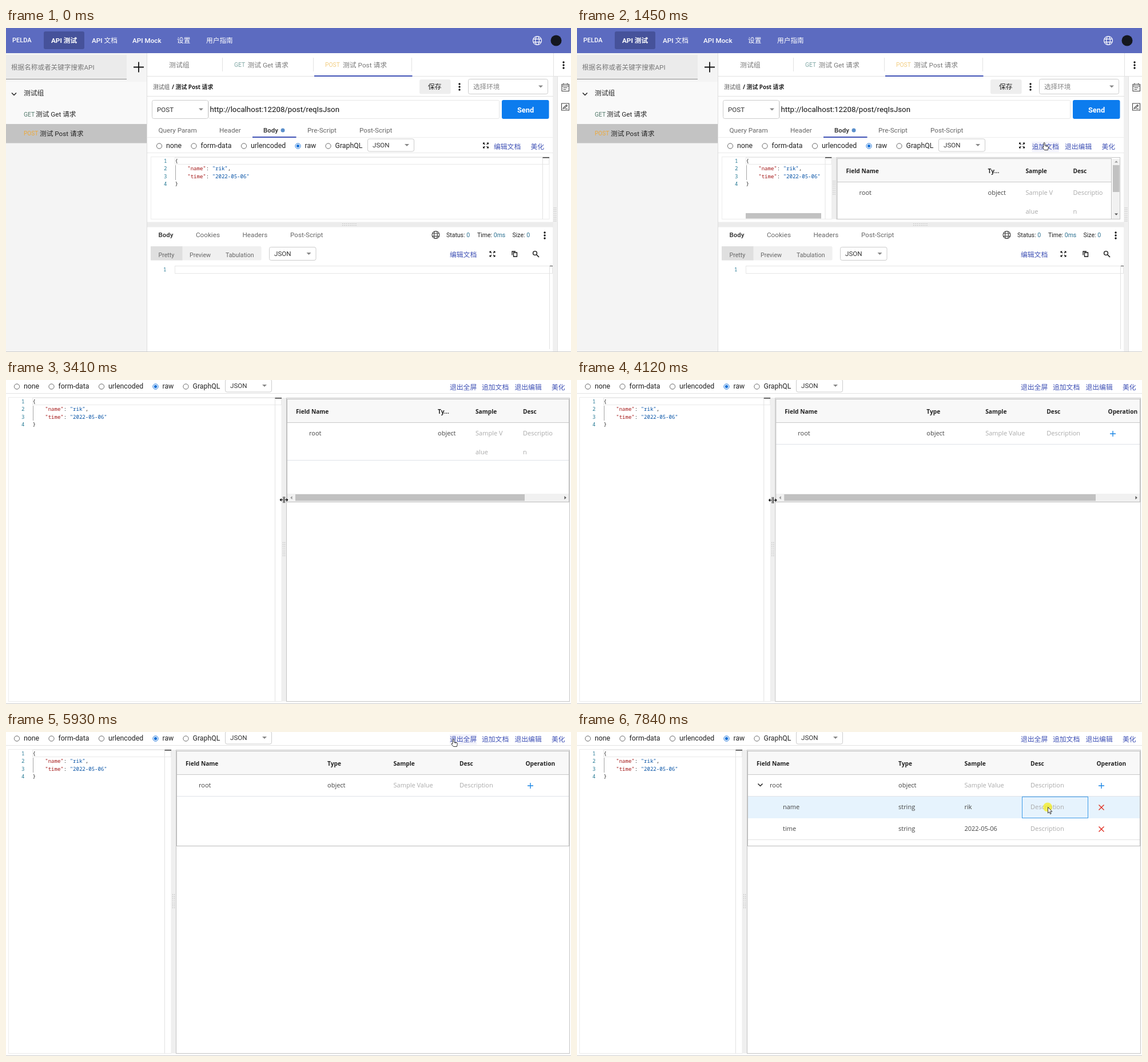
An HTML page that plays this animation: 988x567 px, repeating every 8 s.

```html
<!DOCTYPE html>
<html lang="zh-CN">
<head>
<meta charset="utf-8">
<style>
html, body { margin: 0; width: 100%; height: 100%; overflow: hidden; background: #fff; }
svg { display: block; }
text { white-space: pre; }
.ui { font-family: Roboto, "Noto Sans CJK SC", "Noto Sans CJK", sans-serif; }
.table { font-family: "Open Sans", "Noto Sans CJK SC", "Noto Sans CJK", sans-serif; }
.code { font-family: "Noto Sans Mono", "DejaVu Sans Mono", monospace; }
</style>
</head>
<body>
<svg id="stage" width="988" height="567" viewBox="0 0 988 567"><g id="page"></g><g id="live"></g></svg>
<script>
const LOOP = 8000, LINK = '#3f51b5', GREY = '#aaa';
const PANEL_OPEN = 1060, FULLSCREEN = 2350, ROWS_ADDED = 6840, ROWS_SETTLED = 7250;

// --- drawing helpers ---
const text = (x, y, s, size = 11.7, fill = '#222', weight = 400, font = 'ui') =>
  `<text class="${font}" x="${x}" y="${y + size * 0.36}" font-size="${size}" fill="${fill}" font-weight="${weight}">${s}</text>`;
const cell = (x, y, s, fill = '#444') => text(x, y, s, 11, fill, 400, 'table');
const head = (x, y, s) => text(x, y, s, 10.2, '#222', 700, 'table');
const code = (x, y, s, fill = '#222') => text(x, y, s, 9.06, fill, 400, 'code');
const rect = (x, y, w, h, fill, extra = '') =>
  `<rect x="${x}" y="${y}" width="${w}" height="${h}" fill="${fill}" ${extra}/>`;
const box = (x, y, w, h, stroke, r = 0) => rect(x, y, w, h, 'none', `stroke="${stroke}" rx="${r}"`);
const path = (d, stroke = '#222', width = 1, fill = 'none') =>
  `<path d="${d}" stroke="${stroke}" stroke-width="${width}" fill="${fill}"/>`;
const hline = (x1, x2, y, c = '#e2e2e2') => path(`M${x1} ${y}H${x2}`, c);
const vline = (x, y1, y2, c = '#e2e2e2') => path(`M${x} ${y1}V${y2}`, c);
const disc = (x, y, r, fill) => `<circle cx="${x}" cy="${y}" r="${r}" fill="${fill}"/>`;
const caret = (x, y) => path(`M${x - 4} ${y - 2}h8l-4 4z`, 'none', 0, '#888');
const chevron = (x, y) => path(`M${x - 4} ${y - 2}l4 4l4 -4`, '#222', 1.5);
const kebab = (x, y) => [-5, 0, 5].map(d => disc(x, y + d, 1.7, '#111')).join('');
const select = (x, y, w, h, s, fill = '#333') =>
  box(x + .5, y + .5, w - 1, h - 1, '#ccc', 3) + text(x + 9, y + h / 2, s, 11.6, fill) + caret(x + w - 13, y + h / 2);
const globe = (x, y, r, c) =>
  `<g fill="none" stroke="${c}" stroke-width="1.2"><circle cx="${x}" cy="${y}" r="${r}"/>
  <ellipse cx="${x}" cy="${y}" rx="${r * .45}" ry="${r}"/>
  <path d="M${x - r * .9} ${y - r * .35}h${r * 1.8}M${x - r * .9} ${y + r * .35}h${r * 1.8}"/></g>`;
const expand = (x, y) => [[1, 1], [-1, 1], [1, -1], [-1, -1]].map(([a, b]) =>
  `<g transform="translate(${x} ${y}) scale(${a} ${b})">${path('M1.5 1.5L4 4', '#111', 1.2)}${path('M1.4 5H5V1.4z', 'none', 0, '#111')}</g>`).join('');
const grip = (x, y, vertical) => `<g stroke="#bbb" stroke-width="1.2" stroke-dasharray="1.4 1.9">${[-1.5, 1.5].map(d =>
  vertical ? `<path d="M${x + d} ${y - 13}v26"/>` : `<path d="M${x - 13} ${y + d}h26"/>`).join('')}</g>`;
const triangle = (x, y, angle, c = '#555') =>
  `<path d="M-3 1.5L0 -1.8L3 1.5z" fill="${c}" transform="translate(${x} ${y}) rotate(${angle})"/>`;

// --- the page around the request body ---
function page() {
  const nav = rect(0, 0, 988, 44, '#5c6bc0') + rect(66, 6, 71, 31, '#46529a', 'rx="3"') +
    text(11, 21, 'PELDA', 11, '#fff', 500) +
    [[79, 'API 测试', 700], [150, 'API 文档', 500], [221, 'API Mock', 500], [299, '设置', 500], [350, '用户指南', 500]]
      .map(([x, s, w]) => text(x, 21.5, s, 11.7, '#fff', w)).join('') +
    globe(929, 22, 7.5, '#fff') + disc(962, 22, 9.5, '#14171f');
  const side = rect(0, 44, 246, 523, '#f4f4f4') + rect(0, 47, 211, 43, '#ebebeb') + hline(0, 211, 89.5, '#8c8c8c') +
    text(9, 68.5, '根据名称或者关键字搜索API', 11.6, '#777') + path('M223 68.5h18M232 59.5v18', '#111', 1.8) +
    rect(0, 94, 246, 74, '#f9f9f9') + chevron(14, 115.5) + text(31, 114, '测试组', 11.8) +
    text(31, 151, 'GET', 10.4, '#52796b') + text(52, 150.5, '测试 Get 请求', 11.7) +
    rect(0, 168, 246, 33.5, '#c3c3c3') + text(31, 184.5, 'POST', 10, '#eda93a') +
    text(59, 184.5, '测试 Post 请求', 11.7) + vline(246.5, 44, 567, '#ddd');
  const tabs = hline(247, 958, 84.5) + [378.5, 537.5, 709.5].map(x => vline(x, 52, 76)).join('') +
    rect(539, 83, 171.5, 2, LINK) + text(285, 64.5, '测试组', 11.9, '#777') +
    text(399, 64.5, 'GET', 10.3, '#7fa7a5') + text(422.5, 64.5, '测试 Get 请求', 11.8, '#777') +
    text(558, 64.5, 'POST', 10.3, '#f2cd80') + text(589, 64.5, '测试 Post 请求', 11.8, '#777');
  const rail = vline(957.5, 44, 85) + rect(956, 85, 8, 482, '#f0f0f0') + grip(960, 327, true) + vline(964.5, 85, 567) +
    hline(958, 988, 84.5) + kebab(975, 65) +
    path('M972 98.5h12.5v12H972zM972 101.5h12.5M975 96.5v3M981.5 96.5v3M974.5 104.5h7M974.5 107.5h5', '#444', 1.1) +
    path('M971.5 132h13v12h-13zM974 141l1-2 5-4.5 1.5 1.5-5 4.5zM978 141.5h4', '#444', 1.1);
  const request = text(257, 103, '测试组', 9.8, '#555') +
    text(290, 103, '/ 测试 Post 请求', 9.8, '#222', 700, 'table') +
    rect(723, 90, 54.5, 25.5, '#eee', 'rx="3"') + text(738, 103, '保存', 11.8, '#222', 500) + kebab(793, 103) +
    select(808, 89, 140, 27, '选择环境', '#888') + hline(247, 957, 119.5) +
    box(354.5, 126.5, 508, 32, '#e6e6e6', 2) + select(255, 126, 99, 33, 'POST') +
    text(356.5, 142, 'http://localhost:12208/post/reqIsJson', 13.27, '#111') +
    rect(867, 126, 82.5, 33, '#0c7cee', 'rx="3"') + text(894, 143, 'Send', 12.8, '#fff', 700) +
    [[266.5, 'Query Param'], [373, 'Header'], [527, 'Pre-Script'], [618, 'Post-Script']]
      .map(([x, s]) => text(x, 179, s, 11.7, '#666')).join('') +
    text(450, 179, 'Body', 11.4, '#444', 700) + disc(484, 179, 3.5, '#5b8fcb') +
    hline(247, 957, 191.5, '#eee') + rect(431, 190, 76.5, 2, LINK) + hline(247, 957, 218.5, '#e8e8e8');
  const status = (x, label, value) => text(x, 362, `${label}: <tspan fill="#2a6f8f">${value}</tspan>`, 10.5);
  const response = rect(247, 339.5, 710, 9, '#ececec') + grip(601, 344) + text(266.5, 362, 'Body', 11.4, '#444', 700) +
    [[332, 'Cookies'], [413.5, 'Headers'], [497, 'Post-Script']].map(([x, s]) => text(x, 362, s, 11.7, '#666')).join('') +
    globe(751.5, 362, 6.5, '#444') + status(770, 'Status', '0') + status(824, 'Time', '0ms') + status(885.5, 'Size', '0') +
    kebab(942, 363) + rect(253, 382, 193.5, 24.5, '#f0f0f0', 'rx="2"') + rect(253, 382, 55.5, 24.5, '#dfdfdf') +
    [[266.5, 'Pretty'], [321, 'Preview'], [384, 'Tabulation']].map(([x, s]) => text(x, 397, s, 10.6, '#666')).join('') +
    select(460, 383, 82.5, 24, 'JSON') + text(776, 397, '编辑文档', 11.8, LINK) + expand(850.5, 395.5) +
    path('M885 397.5v-6.5h6M887.5 393h6v7h-6z', '#111', 1.3) +
    path('M928 397l4 4', '#111', 1.6) + `<circle cx="925" cy="394" r="3.4" fill="none" stroke="#111" stroke-width="1.4"/>` +
    code(275, 423, '1', '#237893') + box(295.5, 416.5, 660, 13, '#e6e6e6') + vline(950.5, 416, 562) + hline(951, 956, 416.5, '#444');
  return rect(0, 0, 988, 567, '#fff') + side + nav + tabs + rail + request + response + hline(0, 988, 566.5, '#ccc');
}

// --- request body: toolbar, editor, field table ---
function toolbar(full, open, hover) {
  const shift = full ? 0 : -285.5;
  const radio = (x, label, on) =>
    `<circle cx="${x}" cy="11.5" r="4.6" fill="#fff" stroke="${on ? '#1a73d9' : '#666'}"/>` +
    (on ? disc(x, 11.5, 2.7, '#1a73d9') : '') + text(x + 12, 10.5, label, 12.3);
  const link = (x, s) => (hover(x + shift, s.length * 12) ? rect(x + shift, 4, s.length * 11.8, 18, '#f3f3fb') : '') +
    text(x + shift, 13, s, 11.8, LINK);
  return radio(19, 'none') + radio(79.5, 'form-data') + radio(167, 'urlencoded') + radio(261.5, 'raw', true) +
    radio(314.5, 'GraphQL') + select(383, -1.5, 82, 23, 'JSON') +
    (full ? link(776, '退出全屏') : expand(open ? 529 : 590, 10.5)) +
    (open ? link(832, '追加文档') : '') + link(889.5, open ? '退出编辑' : '编辑文档') + link(954, '美化');
}

function editor(right, bottom, scrollbar) {
  const key = s => `<tspan fill="#a31515">"${s}"</tspan>: `;
  const str = s => `<tspan fill="#0451a5">"${s}"</tspan>`;
  const lines = ['{', `    ${key('name')}${str('rik')},`, `    ${key('time')}${str('2022-05-06')}`, '}'];
  const ruler = right - 11.5;
  return box(4.5, 30.5, right - 4.5, bottom - 30.5, '#ececec') + box(46.5, 31.5, right - 47, 12, '#e8e8e8') +
    lines.map((s, i) => code(27, 38 + i * 13.2, i + 1, '#237893') + code(46.5, 38 + i * 13.2, s)).join('') +
    vline(47.5, 45, 71, '#a5a5a5') + vline(ruler, 31, bottom) + rect(ruler, 31, 11.5, 1.6, '#444') +
    (scrollbar ? rect(46, 129, 132, 9.5, '#c1c1c1') : '');
}

function table(t, split, full, tip) {
  const k = full ? Math.min(1, (486 - split) / 193) : 0;
  const left = split + 5.5, right = full ? 985 : 686;
  const field = split + 21, type = field + 248, sample = type + 66 + 49.5 * k;
  const desc = sample + 83 + 32.5 * k, op = desc + 83 + 32.5 * k;
  const wrap = k < .5, scroll = full && k < .9, bottom = scroll ? 213.5 : 199.5;
  const rowEnd = wrap ? 140.5 : 112.5, added = t >= ROWS_ADDED, settled = t >= ROWS_SETTLED;
  const inside = tip && full && tip.x > left + 10 && tip.x < right;
  const over = (a, b) => inside && tip.y >= a && tip.y < b;
  const rowFill = (a, b, idle) => rect(left, a, right - left, b - a, over(a, b) ? '#e6f3fd' : idle);
  const plus = path(`M${op + 3.5} 94h10M${op + 8.5} 89v10`, '#1e88e5', 1.4);
  const cross = y => path(`M${op + 4} ${y - 4.5}l9 9m0 -9l-9 9`, '#e02c20', 1.4);

  let out = rect(left, 34, right - left, 40, '#f8f8f8') + rowFill(75, rowEnd, '#fff') +
    head(field, 55, 'Field Name') + head(type, 55, wrap ? 'Ty...' : 'Type') + head(sample, 55, 'Sample') +
    head(desc, 55, 'Desc') + head(op, 55, 'Operation') +
    cell(field + 23, 93, 'root') + cell(type, 93, 'object') + plus;
  out += wrap
    ? cell(sample, 93, 'Sample V', GREY) + cell(sample, 126, 'alue', GREY) + cell(desc, 93, 'Descriptio', GREY) + cell(desc, 126, 'n', GREY)
    : cell(sample, 93, 'Sample Value', GREY) + cell(desc, 93, 'Description', GREY);
  if (over(34, 74) || (over(70, 78) && added)) {
    const next = [type, sample, desc, op].find(x => x - 15 > tip.x) || right;
    out += [-3, 0, 3].map(d => hline(next - 40.5, next - 32.5, 54 + d, '#ccc')).join('');
  }
  if (added) {
    const end = settled ? 188.5 : 185.5, y = settled ? 169 : 166;
    out += rowFill(113, 151, settled ? '#fff' : '#fafafa') + rowFill(151, end, '#fff') + chevron(field + 6.5, 92.5) +
      cell(field + 46, 131.5, 'name') + cell(type, 131.5, 'string') + cell(sample, 131.5, 'rik') +
      cell(desc, 131.5, 'Description', GREY) + cross(132) +
      cell(field + 46, y, 'time') + cell(type, y, 'string') + cell(sample, y, '2022-05-06') +
      cell(desc, y, 'Description', GREY) + cross(y + 1) + hline(left, right, end);
    if (t >= 7840) out += box(desc - 14.5, 113.5, 115, 37, '#3d9be9');
  }
  out += hline(left, right, rowEnd, '#dfe2e8');
  if (scroll) out += rect(left, 199, right - left, 14, '#f1f1f1') + rect(split + 20, 200, 907 - split - 20, 11.5, '#c1c1c1') +
    triangle(split + 13, 206, -90, '#999') + triangle(978, 206, 90);
  out += rect(right + .5, 32, 20, 530, '#fff') + hline(left, right, 74.5, '#c8c8c8') +
    box(left, 33.5, right - left - .5, bottom - 33.5, '#bbb');
  if (!full) out += rect(687, 34, 14, 106, '#f1f1f1') + rect(688, 45, 11.5, 47, '#c1c1c1') +
    triangle(694, 39, 0, '#999') + triangle(694, 131, 180);
  return out;
}

function requestBody(t, cursor) {
  const open = t >= PANEL_OPEN, full = t >= FULLSCREEN;
  const dx = full ? 0 : 249, dy = full ? 0 : 195;
  const split = full ? 486 - 193 * ease((t - 3900) / 330) : 200.5;
  const bottom = full ? 562.5 : 139.5, right = full ? 986 : 701;
  const tip = cursor && { x: cursor.x - dx, y: cursor.y - dy };
  const hover = (x, w) => tip && tip.x > x && tip.x < x + w && tip.y > 3 && tip.y < 22;
  let out = full ? rect(0, -3, 988, 570, '#fff') + hline(0, 988, 23.5) + hline(0, 988, 566.5, '#ccc') : '';
  out += toolbar(full, open, hover) + editor(open ? split - 4 : right, bottom, open && !full);
  if (open) out += rect(split - 4, 31, 8, bottom - 31, '#efefef') + grip(split, (31 + bottom) / 2, true) +
    rect(split + 4.5, 31, right - split - 4, bottom - 31, '#fff') +
    table(t, split, full, tip) + box(split + 4.5, 31.5, right - split - 5, bottom - 31.5, '#c4c4c4');
  const [w, h] = full ? [988, 570] : [702, 143];
  return `<svg x="${dx}" y="${dy - 3}" width="${w}" height="${h}" viewBox="0 -3 ${w} ${h}">${out}</svg>`;
}

// --- pointer ---
const STOPS = [
  [130, 950, 391], [880, 872, 200], [1080, 872, 201], [1420, 817, 200], [1740, 817, 201], [1950, 774, 204],
  [2390, 774, 204], [3150, 486, 209], [3900, 486, 209.5], [4230, 293, 210], [4330, 293, 211], [4750, 799, 98],
  [5160, 322, 72], [5230, 322, 72], [5930, 782, 12], [6250, 782, 13], [6560, 848, 11], [6880, 848, 11],
  [7110, 838, 71], [7500, 823, 131]
];
const CLICKS = [[940, 1060], [2140, 2350], [3700, 3900], [6700, 6840], [7840, 8000]];

function ease(p) {
  p = Math.max(0, Math.min(1, p));
  return p * p * (3 - 2 * p);
}

function pointer(t) {
  if (t < STOPS[0][0]) return null;
  const i = STOPS.findIndex(s => s[0] > t);
  if (i < 0) return { x: 823, y: 131, kind: 'arrow' };
  const [t0, x0, y0] = STOPS[i - 1], [t1, x1, y1] = STOPS[i];
  const p = ease((t - t0) / (t1 - t0)), x = x0 + (x1 - x0) * p, y = y0 + (y1 - y0) * p;
  const full = t >= FULLSCREEN;
  const onLink = full ? y < 22 && x > 775 && x < 880 : y < 217 && x > 765 && x < 900;
  const onSplit = full && (t >= 3100 && t < 4350);
  return { x, y, kind: onSplit ? 'resize' : onLink ? 'hand' : 'arrow' };
}

const CURSORS = {
  arrow: path('M.5 .5V11L2.9 8.8L4.5 12.6L6.2 11.9L4.6 8.2H7.8Z', '#222', .9, '#fff'),
  hand: path('M-1 1.2Q0 -.4 1.2 1.2V5.5L6.6 6.8Q7.6 7.2 7.4 8.5L6.4 13.5H.4L-3 9.2Q-3.4 7.6 -1 8.6Z', '#222', .9, '#fff') +
    path('M3 6V8M5 6.5V8.2', '#222', .7),
  resize: path('M-1 -5V6M1.2 -5V6', '#111', 1) + path('M-7 .5h5M2 .5h5', '#111', 1) +
    path('M-7.5 .5l3.2 -3v6zM7.5 .5l-3.2 -3v6z', 'none', 0, '#111')
};

function pointerView(t, c) {
  if (!c) return '';
  const pressed = CLICKS.some(([a, b]) => t >= a && t < b);
  return (pressed ? `<circle cx="${c.x}" cy="${c.y + .5}" r="8" fill="#f5ee1e" fill-opacity=".75"/>` : '') +
    `<g transform="translate(${c.x} ${c.y})">${CURSORS[c.kind]}</g>`;
}

// --- loop ---
const live = document.getElementById('live');
document.getElementById('page').innerHTML = page();
let shown = '';

function render(t) {
  const cursor = pointer(t);
  const view = requestBody(t, cursor) + pointerView(t, cursor);
  if (view !== shown) live.innerHTML = shown = view;
}

const start = performance.now();
function tick() {
  render((performance.now() - start) % LOOP);
  requestAnimationFrame(tick);
}
tick();
</script>
</body>
</html>
```
